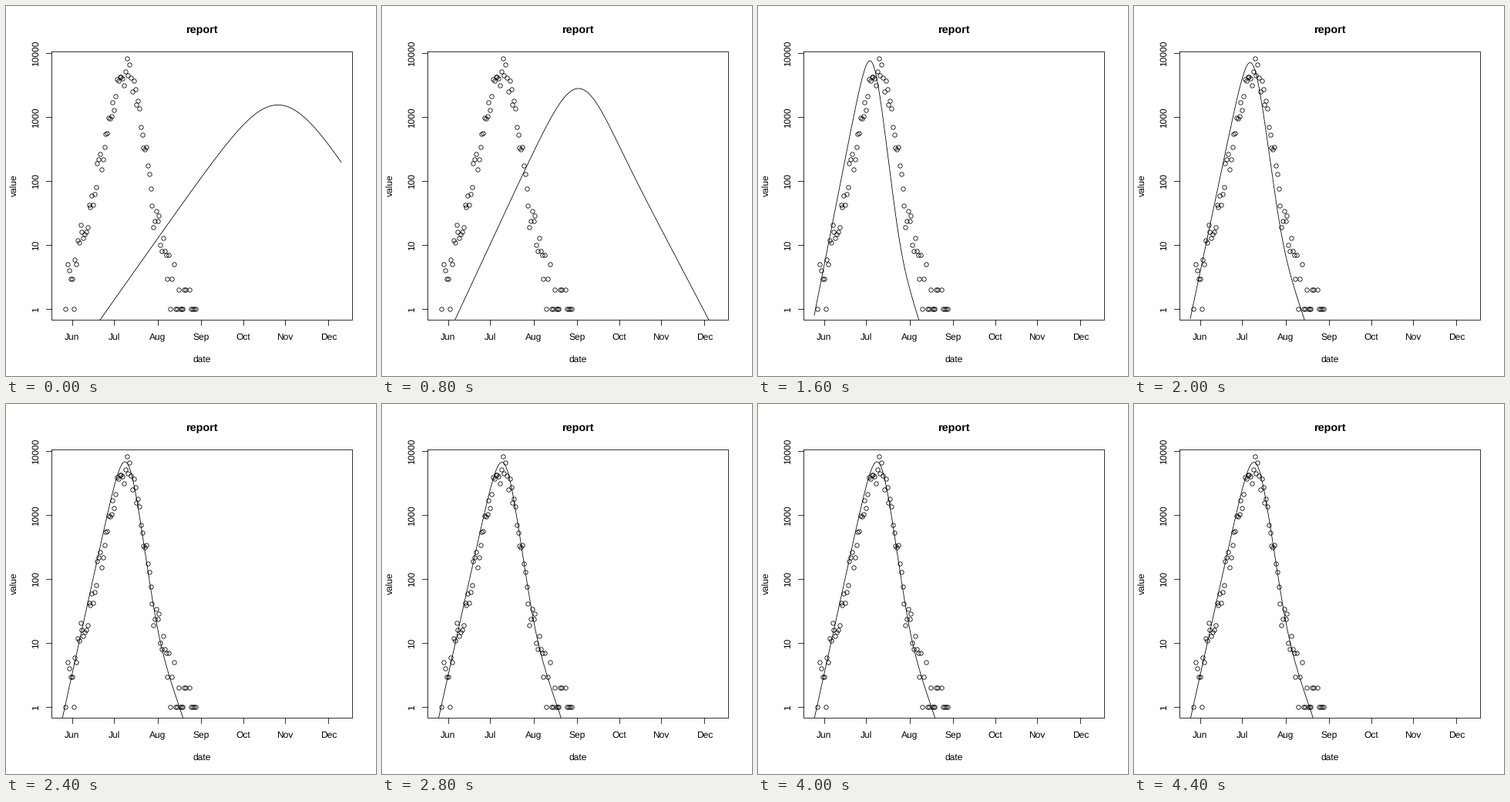
These frames come from a looping animation (480x480 px, 6100 ms). A matplotlib script:

```python
import numpy as np
import matplotlib
import matplotlib.pyplot as plt
from matplotlib.animation import FuncAnimation

SIZE, DPI = 480, 100
PX = 72 / DPI
LEFT, RIGHT, TOP, BOTTOM = 59.04, 449.4, 59.04, 406.56
DAY0, DAY = 73.0, 1.818
ONE, DECADE = 393.4, 83.05
FINAL_GROWTH = 4.49
matplotlib.rcParams.update({"font.family": "Liberation Sans",
                            "text.hinting": "none"})


def day_x(day):
    return DAY0 + DAY * day


def count_y(count):
    return ONE - DECADE * np.log10(count)


def growth_at(frame):
    """Rise of the fitted epidemic: speeding up, falling back, then settling."""
    if frame <= 15:
        n = max(frame - 1, 0)
        return 1.415 * np.exp(0.0257 * n + 0.00486 * n * n)
    if frame < 20:
        k = min(frame - 15, 3)
        return FINAL_GROWTH + 0.77 * np.cos(np.pi * k / 6) ** 2
    k = min(frame - (20 if frame < 36 else 36), 8)
    return FINAL_GROWTH - 0.02 + 0.28 * np.exp(-0.3 * k) * np.cos(np.pi * k / 2)


def curve(x, rise):
    """Height of the epidemic curve: rise, rounded peak, fall, flatter tail."""
    log_rise = np.log(rise)
    peak_x = 64.6 + 408.5 / rise
    peak_y = 148 - 59.1 * log_rise + 7.2 * log_rise ** 2
    fall = rise * (0.72 + 0.19 * rise)
    tail = 1 + 0.42 * rise
    width = 36.5 / rise ** 1.15
    turn_x = peak_x + width * np.log(fall / rise)
    tail_x = peak_x + 71 - 6.2 * rise

    def bend(t, at):
        return width * np.logaddexp(0, (t - at) / width)

    def shape(t):
        return (-rise * t + (rise + fall) * bend(t, turn_x)
                - (fall - tail) * bend(t, tail_x))

    return peak_y + shape(x) - shape(peak_x)


def daily_counts(days):
    """Noisy reports around the final fit, with a weekly dip."""
    rng = np.random.default_rng(7)
    fit = 10 ** ((ONE - curve(day_x(days), FINAL_GROWTH)) / DECADE)
    weekly = 0.1 * (np.cos(2 * np.pi * (days - 5) / 7) - 1)
    noise = rng.normal(0, 0.1, days.size)
    return rng.poisson(1 + fit * 10 ** (weekly + noise))


fig = plt.figure(figsize=(SIZE / DPI, SIZE / DPI), dpi=DPI, facecolor="white")
ax = fig.add_axes([0, 0, 1, 1])
ax.set(xlim=(0, SIZE), ylim=(SIZE, 0))
ax.axis("off")


def stroke(xs, ys):
    return ax.plot(xs, ys, color="black", lw=0.8 * PX)[0]


def label(x, y, text, size=12, turned=False, weight="normal"):
    ax.text(x, y, text, fontsize=size * PX, weight=weight, ha="center",
            va="baseline", rotation=90 if turned else 0,
            rotation_mode="anchor")


stroke([LEFT, RIGHT, RIGHT, LEFT, LEFT], [TOP, TOP, BOTTOM, BOTTOM, TOP])
months = ["Jun", "Jul", "Aug", "Sep", "Oct", "Nov", "Dec"]
for i, name in enumerate(months):
    x = day_x(7 + round(30.5 * i))
    stroke([x, x], [BOTTOM, BOTTOM + 7.2])
    label(x, 433, name)
for power in range(5):
    y = count_y(10 ** power)
    stroke([LEFT - 7.2, LEFT], [y, y])
    label(42, y, str(10 ** power), turned=True)
label(254.2, 35, "report", 14.4, weight="bold")
label(254.2, 462, "date")
label(13.6, 233, "value", turned=True)

days = np.arange(2, 98)
counts = daily_counts(days)
seen = counts > 0
ax.plot(day_x(days[seen]), count_y(counts[seen]), "o",
        ms=5.4 * PX, mfc="none", mec="black", mew=0.8 * PX)

fit_x = day_x(np.arange(0, 199.01, 0.5))
line = stroke([], [])
line.set_clip_path(plt.Rectangle((LEFT, TOP), RIGHT - LEFT, BOTTOM - TOP,
                                 transform=ax.transData))


def update(frame):
    line.set_data(fit_x, curve(fit_x, growth_at(frame)))
    return [line]


anim = FuncAnimation(fig, update, frames=61, interval=100, repeat=True,
                     repeat_delay=0)
plt.show()
```
